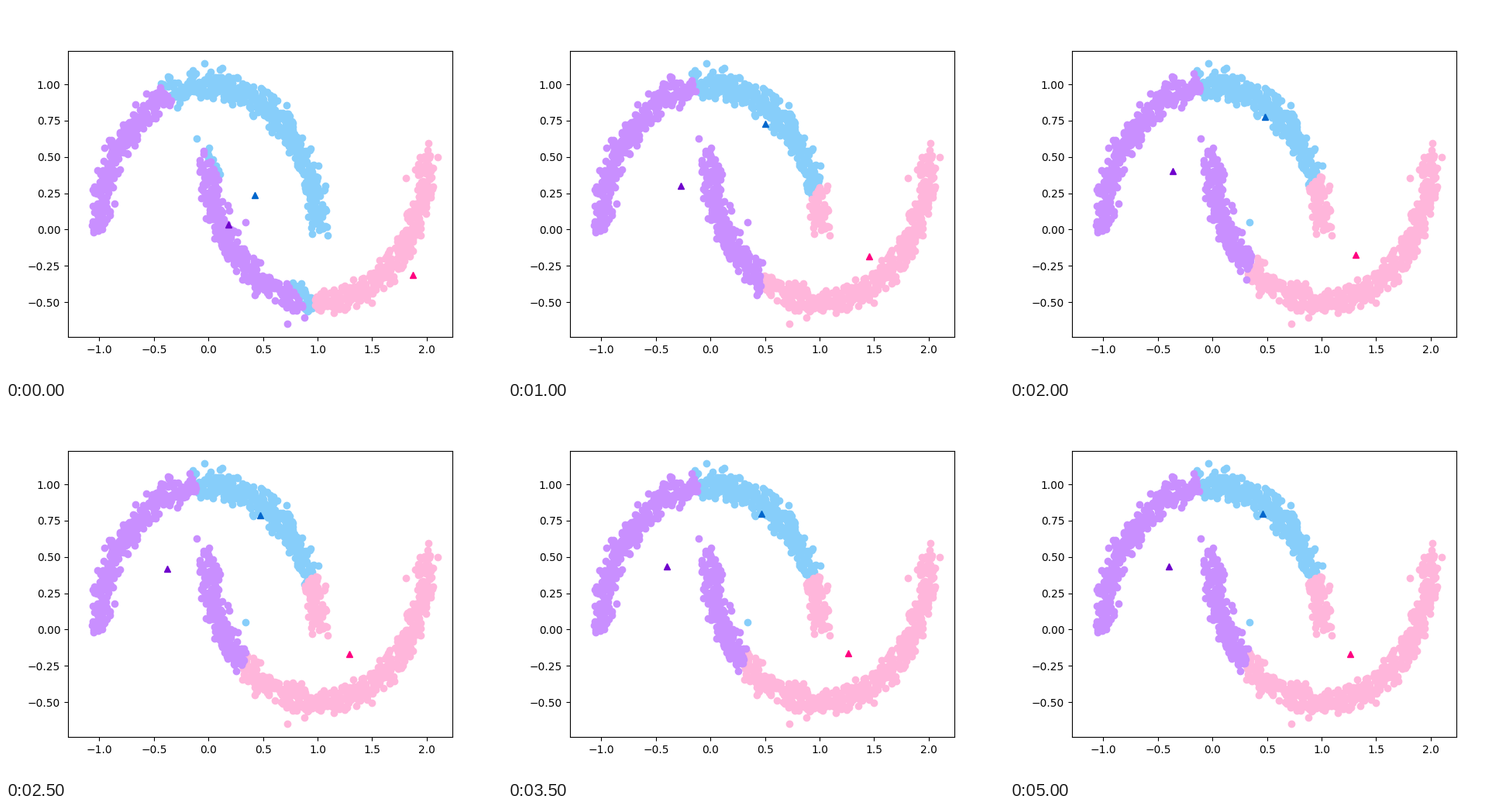
Recreate the animation shown at these times as a matplotlib script. Size 640 by 480 pixels, loop 5.5 s.

```python
import numpy as np
import matplotlib.pyplot as plt
from matplotlib.animation import FuncAnimation

COUNT, NOISE = 1500, 0.05
STEPS, STEP_MS = 11, 500

# A few loners well outside the dense bands
STRAYS = [(-0.04, 1.144), (-0.11, 0.625), (0.34, 0.05),
          (0.725, -0.65), (1.81, 0.355)]

# Light dots, dark centroid and starting position of each cluster
CLUSTERS = [
    ("#87CEFA", "#0066CC", (0.425, 0.237)),
    ("#FFB6DB", "#FF0080", (1.875, -0.315)),
    ("#C98FFF", "#6F00CC", (0.183, 0.032)),
]


def make_moons(rng):
    """Two interleaved half circles with trimmed Gaussian noise."""
    t = np.linspace(0, np.pi, COUNT // 2)
    upper = np.column_stack([np.cos(t), np.sin(t)])
    lower = np.column_stack([1 - np.cos(t), 0.5 - np.sin(t)])
    noise = rng.normal(scale=NOISE, size=(COUNT, 2))
    dense = np.hypot(*noise.T) < 2.5 * NOISE
    return (np.vstack([upper, lower]) + noise)[dense]


def assign(points, centers):
    dist = np.linalg.norm(points[:, None] - centers, axis=2)
    return dist.argmin(axis=1)


def k_means(points, centers):
    """Centroids and labels of every iteration."""
    history = []
    for _ in range(STEPS):
        labels = assign(points, centers)
        history.append((centers, labels))
        centers = np.array([points[labels == k].mean(axis=0)
                            for k in range(len(centers))])
    return history


points = np.vstack([make_moons(np.random.RandomState(0)), STRAYS])
start = np.array([center for _, _, center in CLUSTERS])
history = k_means(points, start)

fig, ax = plt.subplots(figsize=(6.4, 4.8), dpi=100)
ax.set_xlim(-1.2875, 2.236)
ax.set_ylim(-0.7413, 1.232)
dots = [ax.plot([], [], "o", color=light)[0] for light, _, _ in CLUSTERS]
marks = [ax.plot([], [], "^", color=dark)[0] for _, dark, _ in CLUSTERS]


def draw(step):
    centers, labels = history[step]
    for k, (dot, mark) in enumerate(zip(dots, marks)):
        dot.set_data(*points[labels == k].T)
        mark.set_data(*centers[k:k + 1].T)
    return dots + marks


anim = FuncAnimation(fig, draw, frames=STEPS, interval=STEP_MS,
                     repeat=True, repeat_delay=0)
plt.show()
```
